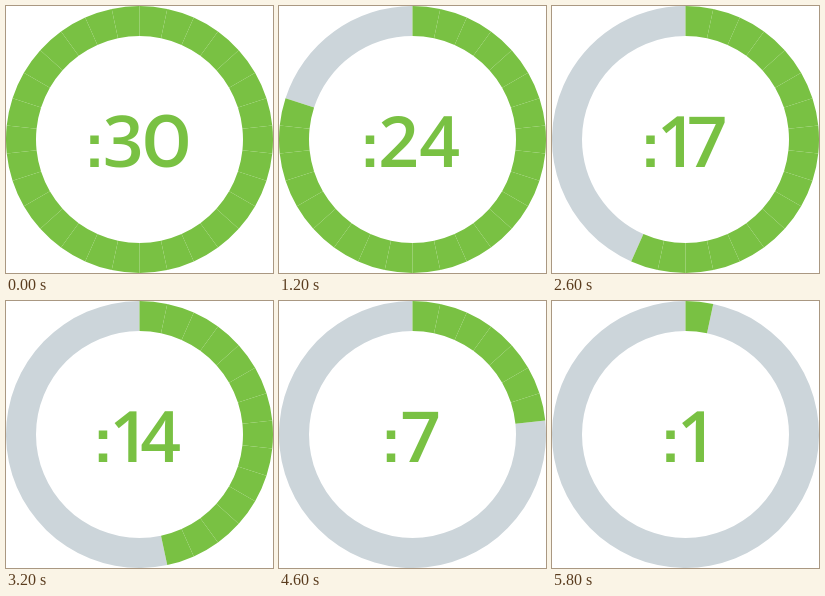
Write an HTML page with a canvas that moves like this. It is 267 px wide and 267 px high and loops after 6 s.

```html
<!DOCTYPE html>
<html lang="en">
<head>
<meta charset="utf-8">
<title>Countdown</title>
<style>
  html, body { margin: 0; width: 100%; height: 100%; overflow: hidden; background: #fff; }
  canvas { display: block; }
</style>
</head>
<body>
<canvas id="stage" width="267" height="267"></canvas>
<script>
const ctx = document.getElementById('stage').getContext('2d');
const SIZE = 267, MID = SIZE / 2, OUTER = 133.5, INNER = 103.5;
const COUNT = 30, STEP = 200, SECTOR = 2 * Math.PI / COUNT;
const GREEN = '#79c143', GREY = '#ccd5da';
const BASELINE = 161, DOT = 8.5, COLON_GAP = 7, DIGIT_GAP = 4;

function band(from, to, color) {
  ctx.beginPath();
  ctx.arc(MID, MID, OUTER, from, to);
  ctx.arc(MID, MID, INNER, to, from, true);
  ctx.fillStyle = color;
  ctx.fill();
}

// The zero is a wide, round oval.
function glyph(digit) {
  const zero = digit === '0';
  const font = zero ? '500 72px Roboto, sans-serif' : '600 71.5px "Open Sans", sans-serif';
  const char = zero ? 'O' : digit;
  ctx.font = font;
  const box = ctx.measureText(char);
  const left = box.actualBoundingBoxLeft;
  return { char, font, left, width: left + box.actualBoundingBoxRight };
}

// Sets the digits by their visible edges and centres the whole label.
function label(n) {
  const glyphs = [...String(n)].map(glyph);
  const width = glyphs.reduce((sum, g) => sum + g.width, DOT + COLON_GAP)
    + DIGIT_GAP * (glyphs.length - 1);
  let x = MID - width / 2;
  ctx.fillStyle = GREEN;
  ctx.fillRect(x, 129.5, DOT, DOT);
  ctx.fillRect(x, BASELINE - DOT, DOT, DOT);
  x += DOT + COLON_GAP;
  for (const g of glyphs) {
    ctx.font = g.font;
    ctx.fillText(g.char, x + g.left, BASELINE);
    x += g.width + DIGIT_GAP;
  }
}

function draw(time) {
  const left = COUNT - Math.floor(time / STEP) % COUNT;
  ctx.clearRect(0, 0, SIZE, SIZE);
  const top = -Math.PI / 2;
  if (left < COUNT) band(top + left * SECTOR, top + 2 * Math.PI, GREY);
  // Separate sectors leave faint seams where they meet.
  for (let i = 0; i < left; i++) band(top + i * SECTOR, top + (i + 1) * SECTOR, GREEN);
  label(left);
}

let start;
function tick(now) {
  start ??= now;
  draw(now - start);
  requestAnimationFrame(tick);
}
draw(0);
requestAnimationFrame(tick);
</script>
</body>
</html>
```
